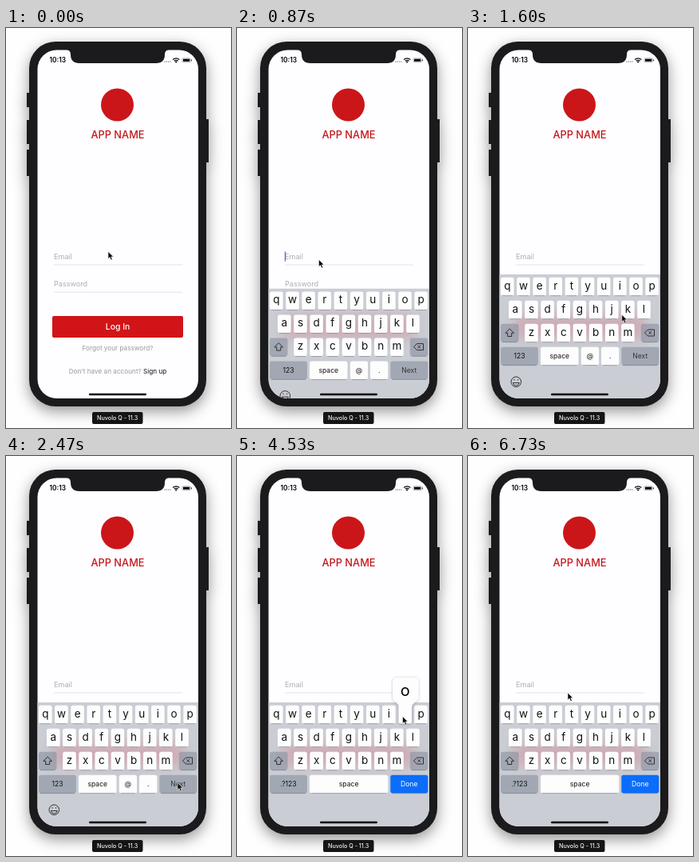
An HTML page that plays this animation: 282 by 500 pixels, repeating every 6790 ms.

```html
<!DOCTYPE html>
<html lang="en">
<head>
<meta charset="utf-8">
<title>Login form</title>
<style>
html, body { margin: 0; height: 100%; overflow: hidden; background: #fefefe; }
svg { display: block; width: 100vw; height: 100vh; font-family: Inter, Roboto, sans-serif; }
text { white-space: pre; }
.body { filter: drop-shadow(0 6px 9px rgba(0, 0, 0, .42)); }
.mid { text-anchor: middle; }
.hint { fill: #adadb1; font-size: 9.1px; }
.small { fill: #99999d; font-size: 8.2px; }
.letter { font-size: 13.5px; }
.word { font-size: 8.6px; }
.icon { fill: none; stroke: #222; stroke-width: .9; stroke-linejoin: round; }
</style>
</head>
<body>
<svg viewBox="0 0 282 500">
  <defs>
    <clipPath id="screen"><rect x="39.5" y="27.5" width="201.5" height="435.5" rx="24"/></clipPath>
    <clipPath id="board"><rect x="39" y="270" width="203" height="200"/></clipPath>
    <clipPath id="panel"><rect x="39" y="308" width="203" height="170"/></clipPath>
    <filter id="blur" x="-30%" y="-150%" width="160%" height="400%"><feGaussianBlur stdDeviation="8"/></filter>
    <filter id="lift" x="-30%" y="-30%" width="160%" height="160%"><feDropShadow dx="0" dy=".5" stdDeviation="1.4" flood-opacity=".28"/></filter>
  </defs>

  <g class="body" fill="#1b1a1c">
    <path d="M26 81h4v18h-4zM26 115h4v30h-4zM26 152h4v33h-4zM250 114h4v54h-4z"/>
    <rect x="29" y="17" width="222" height="456" rx="33"/>
  </g>

  <g clip-path="url(#screen)">
    <rect x="39" y="27" width="203" height="437" fill="#fefdff"/>
    <circle cx="139.5" cy="96" r="20.5" fill="#cb1619"/>
    <text class="mid" x="140" y="137.7" font-size="12.8" font-weight="500" fill="#c4181c">APP NAME</text>

    <text class="hint" x="60" y="289">Email</text>
    <text class="hint" x="60" y="323">Password</text>
    <path d="M60 296h161M60 330.3h161" stroke="#dcdcdf" stroke-width=".8"/>
    <rect id="caret" x="59.8" y="279.5" width="1.2" height="12" fill="#3d6df0"/>

    <rect x="58" y="360" width="164" height="27" rx="2" fill="#d01418"/>
    <text class="mid" x="140" y="377.3" font-size="10.4" font-weight="500" fill="#fff">Log In</text>
    <text class="mid small" x="140" y="403">Forgot your password?</text>
    <text class="mid small" x="140" y="432">Don't have an account? <tspan fill="#111">Sign up</tspan></text>

    <g id="keyboard" clip-path="url(#board)">
      <g clip-path="url(#panel)">
        <rect x="39" y="308" width="203" height="170" fill="#cacdd4"/>
        <rect id="tint" x="58" y="360" width="164" height="27" fill="#e03040" opacity=".22" filter="url(#blur)"/>
      </g>
      <g id="letters"></g>
      <g id="mail">
        <g class="icon" stroke="#555">
          <circle cx="60.3" cy="442.3" r="6.3"/>
          <path d="M56.3 443.5h8q-.6 3.5-4 3.5t-4-3.5zM58 439v1.6M62.6 439v1.6"/>
        </g>
      </g>
      <g id="secret"></g>
      <g id="popup">
        <path d="M200 277h22q5.500 0 5.500 5.500v19c0 6-8.500 6-8.500 13v17q0 3-3 3h-10q-3 0-3-3v-17c0-7-8-7-8-13v-19q0-5.500 5-5.500z" fill="#fdfdfe" filter="url(#lift)"/>
        <text class="mid" x="210.800" y="300" font-size="20">o</text>
      </g>
    </g>
    <rect x="104" y="456.700" width="72" height="2.600" rx="1.300" fill="#050505"/>
  </g>

  <path d="M76 27q5 1 5 6q0 11 11 11h96q11 0 11-11q0-5 5-6z" fill="#1b1a1c"/>
  <text x="54.500" y="43.200" font-size="8.300" font-weight="600">10:13</text>
  <path d="M198.500 42.200h8" stroke="#777" stroke-width="1.300" stroke-dasharray="1.200 1.100"/>
  <g fill="none" stroke="#111" stroke-width="1.300">
    <path d="M209 39.500q4.200-3.400 8.400 0M210.700 41.300q2.500-2 5 0"/>
    <rect x="221" y="37.900" width="10.200" height="4.800" rx="1.200" stroke="#777" stroke-width=".6"/>
  </g>
  <circle cx="213.200" cy="42.500" r="1.100"/>
  <path d="M222 38.800h8.200v3h-8.200zM231.900 39.400h.9v1.800h-.9z"/>

  <rect x="108" y="480" width="63.500" height="15" rx="2" fill="#151515"/>
  <text class="mid" x="139.700" y="490.400" font-size="7.200" font-weight="500" fill="#f4f4f4">Nuvolo Q - 11.3</text>

  <path id="cursor" d="M0 0v9l2.100-1.900 1.500 3.500 1.700-.8-1.500-3.300h2.800z" fill="#080808" stroke="#fff" stroke-width=".6"/>
</svg>

<script>
const $ = id => document.getElementById(id);
const LOOP = 6790, FPS = 15;
const GREY = 'rgba(137,145,160,.62)';

function key(group, x, y, w, label, kind = 'letter', fill = '#fdfdfe', ink = '#111') {
  const rise = kind === 'letter' ? 14.8 : 14.2;
  group.insertAdjacentHTML('beforeend', `
    <path d="M${x + 2} ${y + 22.8}h${w - 4}" stroke="#858990" stroke-width="1"/>
    <rect x="${x}" y="${y}" width="${w}" height="22.5" rx="2.6" fill="${fill}"/>
    <text class="mid ${kind}" x="${x + w / 2}" y="${y + rise}" fill="${ink}">${label}</text>`);
}

const letters = $('letters'), mail = $('mail'), secret = $('secret');
['qwertyuiop', 'asdfghjkl', 'zxcvbnm'].forEach((row, r) => {
  const left = [41, 51, 71.2][r];
  [...row].forEach((c, i) => key(letters, left + i * 20.15, 311.8 + r * 29, 16.6, c));
});
key(letters, 41, 369.8, 22.5, '', 'word', GREY);
key(letters, 216.8, 369.8, 22.5, '', 'word', GREY);
letters.insertAdjacentHTML('beforeend', `<path class="icon" d="M52.200 376l5.300 5.300h-2.800v4.200h-5v-4.200h-2.800z
  M225.500 377h8v8h-8l-4-4zM226.500 379.200l3.600 3.600m0-3.600l-3.600 3.600"/>`);

const bottom = 398.8;
key(mail, 41, bottom, 47, '123', 'word', GREY);
key(mail, 91, bottom, 47.5, 'space', 'word');
key(mail, 141.8, bottom, 22.3, '@', 'word');
key(mail, 167, bottom, 22.3, '.', 'word');
key(mail, 192.3, bottom, 47, 'Next', 'word', GREY, '#333');
const next = mail.querySelector('rect:last-of-type');
key(secret, 41, bottom, 47, '.?123', 'word', GREY);
key(secret, 91, bottom, 98.3, 'space', 'word');
key(secret, 192.3, bottom, 47, 'Done', 'word', '#0b6dfb', '#fff');

// Pointer stops: time, x, y
const path = [
  [0, 128, 279.5], [330, 78, 284], [735, 78, 284], [1060, 146, 299], [1200, 151, 304],
  [1930, 224, 399], [2400, 215, 408.5], [3330, 215, 408.5], [4070, 214, 348],
  [4400, 207.5, 325.5], [5740, 207.5, 325.5], [6070, 172, 317], [6200, 172, 317],
  [6470, 112, 287], [6730, 125, 296]
];
const clamp = v => Math.max(0, Math.min(1, v));
const within = (t, spans) => spans.some(([a, b]) => t >= a && t < b);
const show = (el, on) => el.setAttribute('opacity', +on);

function pointer(t) {
  const i = path.findIndex(p => p[0] > t);
  if (i < 0) return path.at(-1).slice(1);
  const [t0, x0, y0] = path[i - 1], [t1, x1, y1] = path[i];
  const u = (t - t0) / (t1 - t0), e = u * u * (3 - 2 * u);
  return [x0 + (x1 - x0) * e, y0 + (y1 - y0) * e];
}

function draw(now) {
  const t = Math.floor((now % LOOP + 4) * FPS / 1000) * 1000 / FPS;
  const dy = 157 * (1 - clamp((t - 600) / 515)) ** 3;
  $('keyboard').setAttribute('transform', `translate(0 ${dy})`);
  $('tint').setAttribute('transform', `translate(0 ${-dy})`);

  const swap = clamp((t - 2660) / 270);
  show(mail, 1 - swap);
  show(secret, swap);
  next.setAttribute('fill', within(t, [[2590, 2720]]) ? '#fdfdfe' : GREY);
  show($('caret'), within(t, [[530, 1390], [1790, 2190], [2590, 2720]]));
  show($('popup'), within(t, [[4530, 4730], [4860, 4990], [5130, 5260], [5395, 5795]]));
  $('cursor').setAttribute('transform', `translate(${pointer(t)})`);
  requestAnimationFrame(tick);
}

const start = performance.now();
function tick() { draw(performance.now() - start); }
tick();
</script>
</body>
</html>
```
